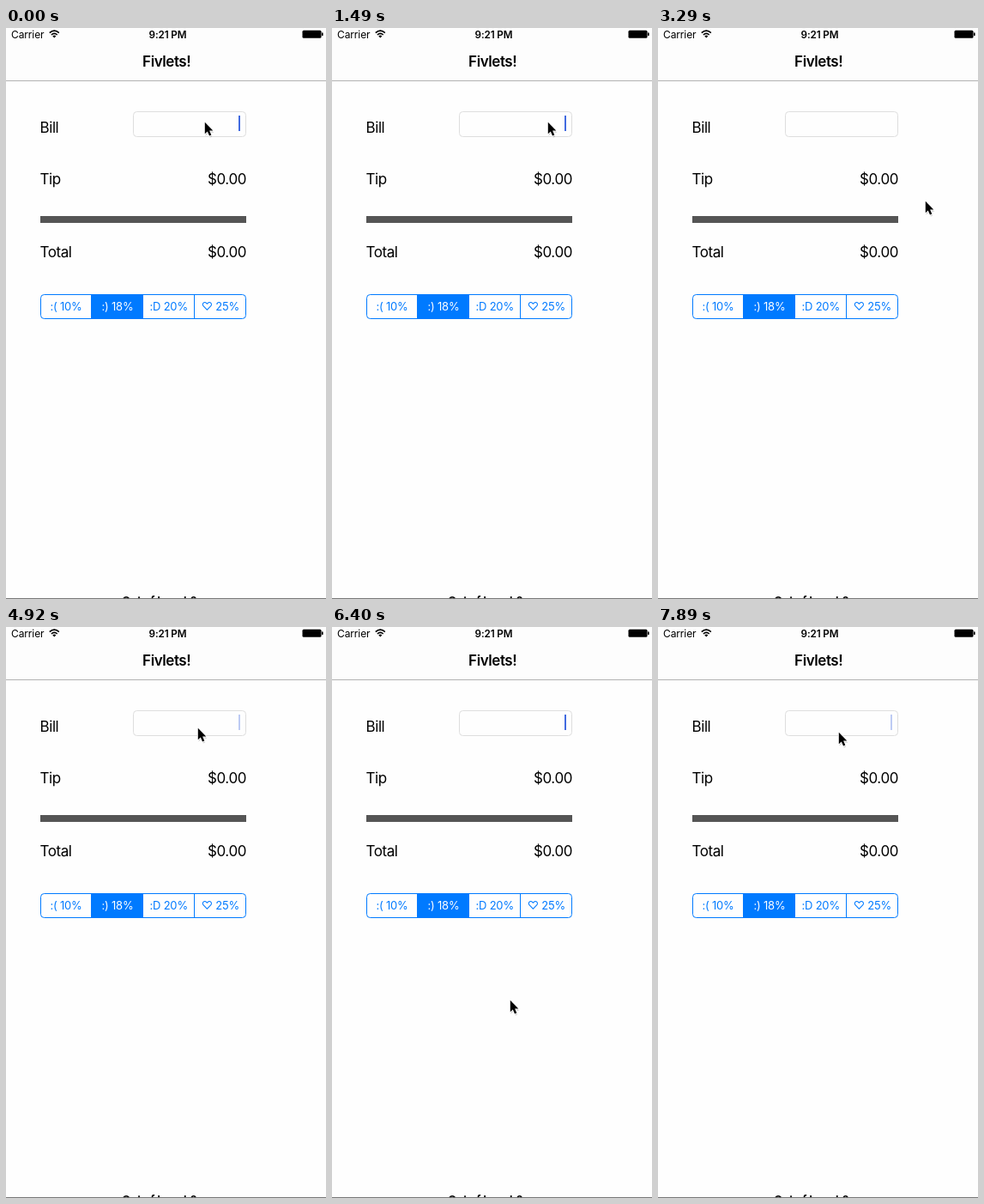
Animation of 373 by 665 pixels, one loop 8000 ms. Source, as an HTML page:

```html
<!DOCTYPE html>
<html lang="en">
<head>
<meta charset="utf-8">
<title>Tip calculator</title>
<style>
  html, body { margin: 0; width: 100%; height: 100%; overflow: hidden; background: #fefefe; }
  svg { display: block; width: 373px; height: 665px; }
  text { font-family: Inter, "DejaVu Sans", sans-serif; letter-spacing: -.025em; }
  .status { font-size: 12px; letter-spacing: -.01em; }
  .clock { font-weight: 600; font-size: 11.7px; }
  .title { font-weight: 600; font-size: 17px; }
  .label { font-size: 17px; }
  .mid { text-anchor: middle; }
  .end { text-anchor: end; }
  .seg { font-size: 13px; fill: #007aff; text-anchor: middle; letter-spacing: -.015em; }
  .seg.on { fill: #fff; }

  /* 8 s loop; poses are held, shifted 1 ms so changes land on time */
  #caret, #pointer { animation: 8s step-end -1ms infinite; }
  #caret { animation-name: blink; }
  #pointer { animation-name: move; }

  @keyframes blink {
    0%, 5.5%, 18.625%, 31.75%, 54.125%, 68.875%, 80%, 93% { opacity: 1; }
    16.75% { opacity: .7; }
    3.625%, 9.25%, 14.875%, 26.125%, 29.875%, 39.25%, 61.5%,
    67.125%, 72.625%, 78.125%, 85.5%, 91.125%, 98.625% { opacity: .35; }
    1.875%, 11.125%, 28%, 41.125%, 63.375%, 74.5%, 87.375% { opacity: 0; }
  }
  @keyframes move {
    0% { transform: translate(231px, 109px); }
    1.875% { transform: translate(237px, 109px); }
    3.625% { transform: translate(246px, 109px); }
    5.5% { transform: translate(251px, 109px); }
    28% { transform: translate(245px, 112px); }
    29.875% { transform: translate(232px, 118px); }
    31.75% { transform: translate(222px, 128px); }
    33.625% { transform: translate(226px, 146px); }
    35.5% { transform: translate(252px, 168px); }
    37.375% { transform: translate(278px, 178px); }
    39.25% { transform: translate(304px, 196px); }
    41.125% { transform: translate(311px, 201px); }
    48.5% { transform: translate(245px, 143px); }
    50.375% { transform: translate(223px, 117px); }
    74.5% { transform: translate(222px, 150px); }
    76.375% { transform: translate(216px, 265px); }
    78.125% { transform: translate(210px, 390px); }
    80% { transform: translate(207px, 434px); }
    81.875% { transform: translate(185px, 400px); }
    83.625% { transform: translate(174px, 345px); }
    85.5% { transform: translate(190px, 320px); }
    93% { transform: translate(190px, 298px); }
    94.875% { transform: translate(196px, 220px); }
    96.75% { transform: translate(206px, 145px); }
    98.625%, 100% { transform: translate(210px, 122px); }
  }
</style>
</head>
<body>
<svg viewBox="0 0 373 665">
  <rect width="373" height="61" fill="#fdfdfd"/>
  <rect y="61" width="373" height="1" fill="#b2b2b2"/>

  <!-- status bar -->
  <text class="status" x="6" y="11.5">Carrier</text>
  <g fill="none" stroke="#000" stroke-width="1.7">
    <path d="M50.8 5.7Q56.3 .6 61.8 5.7M52.9 8Q56.3 4.8 59.7 8"/>
    <path d="M54.3 9.4Q56.3 7.6 58.3 9.4L56.3 11.6Z" fill="#000" stroke="none"/>
  </g>
  <text class="status clock mid" x="188.5" y="11.5">9:21 PM</text>
  <rect x="345.5" y="2.8" width="22" height="9" rx="1.5"/>
  <rect x="368" y="5.3" width="1.6" height="4" rx=".8"/>

  <text class="title mid" x="187.2" y="45">Fivlets!</text>

  <!-- amounts -->
  <rect x="148.5" y="97.5" width="131" height="29" rx="4" fill="#fefefe" stroke="#dedede"/>
  <text class="label" x="39.5" y="122.3">Bill</text>
  <text class="label" x="39.5" y="182.3">Tip</text>
  <text class="label end" x="280" y="182.3">$0.00</text>
  <rect x="40" y="219" width="240" height="8" fill="#555"/>
  <text class="label" x="39.5" y="267.3">Total</text>
  <text class="label end" x="280" y="267.3">$0.00</text>

  <!-- tip picker -->
  <rect x="40.5" y="310.5" width="239" height="28" rx="4" fill="#fefefe" stroke="#007aff"/>
  <rect x="99" y="310" width="61" height="29" fill="#007aff"/>
  <rect x="219" y="310" width="1" height="29" fill="#007aff"/>
  <text class="seg" x="70" y="329.3">:( 10%</text>
  <text class="seg on" x="130" y="329.3">:) 18%</text>
  <text class="seg" x="189.7" y="329.3">:D 20%</text>
  <text class="seg" x="250" y="329.3">♡ 25%</text>

  <!-- window edge -->
  <text class="mid" x="178.5" y="671.5" font-size="13.5" font-weight="600">Out of Lunch?</text>
  <rect y="664" width="373" height="1" fill="#777"/>

  <rect id="caret" x="271" y="102" width="2" height="18" fill="#426be0"/>
  <g id="pointer">
    <path d="M1.5 2.5V16.5L4.6 13.6 6.8 18.6 9.2 17.6 7 12.7H11.4Z" fill="#000" opacity=".18"/>
    <path d="M.8 .8V14.3L3.8 11.5 6 16.6 8.3 15.6 6.1 10.6H10.3Z" stroke="#fff" stroke-width="1.6" paint-order="stroke"/>
  </g>
</svg>
</body>
</html>
```
